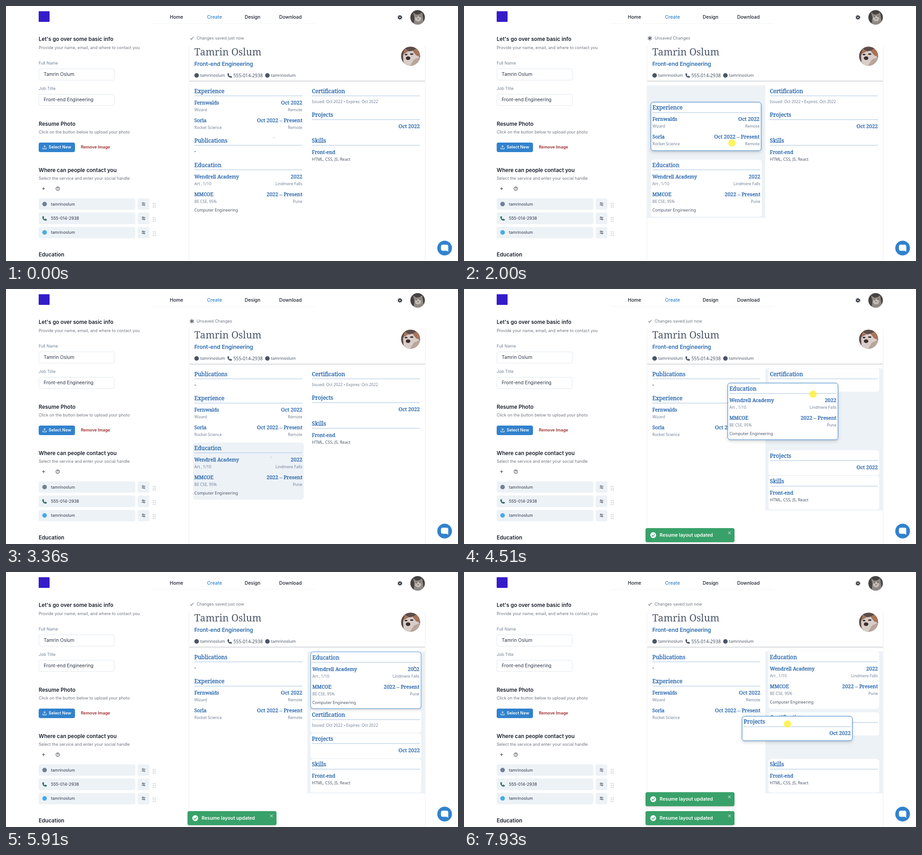
Animation of 996x562 px, one loop 8 s. Source, as an HTML page:

```html
<!DOCTYPE html>
<html lang="en">
<head>
<meta charset="utf-8">
<title>Resume builder</title>
<style>
html, body { margin: 0; width: 100%; height: 100%; overflow: hidden; background: #fff; }
#stage { position: relative; width: 996px; height: 562px; overflow: hidden; background: #fff; }
#stage div, #stage svg { position: absolute; box-sizing: border-box; }
#stage svg { left: 0; top: 0; }
#stage .over { z-index: 9; }
.t { white-space: pre; font: 400 9.08px/20px Inter, sans-serif; color: #717680; }
.head { font-size: 11.67px; font-weight: 600; color: #1a202c; }
.label { color: #718096; }
.nav { font-size: 10.375px; font-weight: 500; color: #1a202c; }
.active { color: #3182ce; }
.value { font-size: 10.375px; color: #2d3748; }
.row { color: #2d3748; }
.strong { font-weight: 600; color: #fff; }
.red { font-weight: 600; color: #9b2c2c; }
.name { font: 400 21.5px/20px "Noto Serif", serif; color: #4a5568; }
.job { font-size: 12.1px; font-weight: 500; color: #2b6cb0; -webkit-text-stroke: .2px #2b6cb0; }
.sec, .item, .date { font: 500 12.4px/20px "Noto Serif", serif; color: #2867ad; margin-top: -.6px; -webkit-text-stroke: .4px #2867ad; }
.item { font-size: 10.9px; }
.date { font-size: 11.5px; }
.sub, .body, .num { font: 400 8.7px/20px "Noto Sans", sans-serif; color: #718096; }
.body { font-size: 9px; color: #4a5568; }
.num { font-size: 10.2px; color: #4a5568; }
.msg { font-size: 10.375px; font-weight: 600; color: #fff; }
.input { left: 72px; width: 166.5px; height: 26.5px; border: 1px solid #e2e8f0; border-radius: 4px; }
.fill { height: 25.6px; background: #edf2f7; border-radius: 4px; }
.col { top: 175px; background: #edf2f7; }
.card { left: 0; top: 0; width: 244px; border: 0 solid; border-radius: 6px; }
.rule { left: 3px; right: 3px; top: 22.4px; height: 1px; background: #a3c1de; }
.toast { left: 400px; top: 0; width: 196px; height: 31px; border-radius: 4px; background: #38a169; box-shadow: 0 3px 6px rgba(0,0,0,.12); }
</style>
</head>
<body>
<div id="stage">
  <div style="left:404px;top:82px;width:519px;height:600px;box-shadow:0 1px 3px rgba(0,0,0,.13)"></div>
  <div style="left:400px;top:74px;width:528px;height:14px;background:#fff"></div>
  <div style="left:404px;top:164.6px;width:519px;height:1px;background:#b0b5be"></div>
  <div style="left:323px;top:38px;width:359px;height:1px;background:#f1f3f5"></div>
  <div class="input" style="top:137.5px"></div>
  <div class="input" style="top:193.5px"></div>
  <div style="left:72px;top:301px;width:80px;height:20.8px;border-radius:4px;background:#3182ce"></div>
  <div id="rows"></div>
  <svg width="996" height="562" fill="none">
    <defs>
      <path id="phone" d="M-4.4-4.3-2.3-5-.9-2-2.2-.8Q-1.2 1.3.8 2.2L2-1+2 .9 5 2.3 4.3 4.4Q4 5 3.2 5-5 4.6-5-3.3-5-4-4.4-4.3Z"/>
      <g id="sliders" stroke="#2d3748" stroke-width="1"><path d="M0-2h4M-4 2h4"/><circle cx="-1.5" cy="-2" r="1.5"/><circle cx="1.5" cy="2" r="1.5"/></g>
      <g id="dots" fill="#a0a5ad"><circle cx="-2" cy="-4" r=".9"/><circle cx="2" cy="-4" r=".9"/><circle cx="-2" r=".9"/><circle cx="2" r=".9"/><circle cx="-2" cy="4" r=".9"/><circle cx="2" cy="4" r=".9"/></g>
      <clipPath id="round1"><circle cx="907" cy="25" r="16"/></clipPath>
      <clipPath id="round2"><circle cx="891.5" cy="110.5" r="21"/></clipPath>
    </defs>
    <rect x="72" y="11.5" width="24" height="23.5" rx="1" fill="#351cc9"/>
    <g stroke="#1a202c"><circle cx="868" cy="25" r="2.6" stroke-width="2"/><circle cx="868" cy="25" r="4.4" stroke-width="1.5" stroke-dasharray="1.75 1.705"/></g>
    <g clip-path="url(#round1)">
      <path d="M890 8h34v34h-34z" fill="#454241"/>
      <path d="M898 42 900 26 897 14 904 19 911 18 917 14 919 27 921 42z" fill="#8f8883"/>
      <ellipse cx="908" cy="28" rx="7" ry="6" fill="#c2bbb5"/>
      <path d="M904 24h2M911 23h2M907 28h2" stroke="#3a3635" stroke-width="1.6"/>
    </g>
    <g clip-path="url(#round2)">
      <path d="M870 89h43v43h-43z" fill="#5d4d4a"/>
      <path d="M876 124 875 110 879 95 888 100 899 98 908 93 913 132H884z" fill="#d8cdc8"/>
      <path d="M876 106 879 94 887 100zM896 99 908 91 913 112 904 109z" fill="#a8745a"/>
      <path d="M899 118 913 112V132H890z" fill="#b9a59b"/>
      <ellipse cx="886" cy="115" rx="5" ry="4" fill="#3c2e2c"/>
      <path d="M880 107h3M892 106h4" stroke="#30282a" stroke-width="3" stroke-linecap="round"/>
    </g>
    <path id="saved" d="M406 71l2.4 2.6 5-5.6" stroke="#5a6270" stroke-width="1.1"/>
    <path id="unsaved" d="M409.5 66v10M405.2 68.5l8.6 5M405.2 73.5l8.6-5" stroke="#5a6270" stroke-width="1.6"/>
    <path d="M85 313v-5M82.8 309.8 85 307.5l2.2 2.3M81.2 312v3h7.6v-3" stroke="#fff"/>
    <path d="M79.5 402.5h6.5M82.75 399.25v6.5" stroke="#2d3748"/>
    <circle cx="114" cy="402.5" r="4" stroke="#2d3748"/>
    <path d="M112.7 401.5q0-1.3 1.3-1.3t1.3 1.2q0 .6-1.3 1.4v.5M114 404v.9" stroke="#2d3748" stroke-width=".9"/>
    <circle cx="85" cy="436.5" r="5" fill="#718096"/>
    <use href="#phone" x="85" y="468" fill="#2c6e69"/>
    <circle cx="85" cy="499" r="5" fill="#45aaea"/>
    <circle cx="420" cy="153" r="5" fill="#4a5568"/>
    <use href="#phone" x="493" y="153" fill="#4a5568"/>
    <circle cx="576" cy="153" r="5" fill="#4a5568"/>
    <use href="#sliders" x="303" y="436.5"/><use href="#sliders" x="303" y="468"/><use href="#sliders" x="303" y="499"/>
    <use href="#dots" x="326.5" y="439"/><use href="#dots" x="326.5" y="470.5"/><use href="#dots" x="326.5" y="502"/>
    <circle cx="966.5" cy="533.5" r="16.2" fill="#3182ce"/>
    <path d="M962.5 526h8q4 0 4 4v11.5l-3.5-2h-8.500q-4 0-4-4V530q0-4 4-4z" fill="#fff"/>
  </svg>
  <div id="texts"></div>
  <div id="cols"></div>
  <div id="toasts" class="over"></div>
  <svg class="over" width="996" height="562">
    <circle id="press" r="8" fill="#fff02e" fill-opacity=".78"/>
    <rect id="dot" width="1.2" height="1.2" fill="#777"/>
    <path id="hand" d="M-2 0V-3.5q.8-1 1.5 0V-.8L2.5 0Q3.8.5 3.4 2L2.6 5H-1.6L-4 1.5Q-3.6.4-2 1.5z" fill="#fff" stroke="#555" stroke-width=".8"/>
  </svg>
</div>
<script>
const $ = id => document.getElementById(id);
const div = (parent, cls, css = '') => {
  const el = document.createElement('div');
  el.className = cls;
  el.style.cssText = css;
  parent.append(el);
  return el;
};
// y is the middle of the capitals; a negative x is measured from the right edge
const text = (parent, x, y, str, cls = '') => {
  const el = div(parent, 't ' + cls, `${x < 0 ? 'right' : 'left'}:${Math.abs(x)}px;top:${y - 10}px`);
  el.textContent = str;
  return el;
};

const person = 'Tamrin Oslum', handle = 'tamrinoslum', phone = '555-014-2938', job = 'Front-end Engineering';
const page = $('texts');
[
  [361, 25, 'Home', 'nav'], [443, 25, 'Create', 'nav active'], [526, 25, 'Design', 'nav'], [602, 25, 'Download', 'nav'],
  [72, 73, "Let's go over some basic info", 'head'],
  [72, 91.5, 'Provide your name, email, and where to contact you'],
  [72, 126, 'Full Name', 'label'], [83, 151, person, 'value'],
  [72, 181.5, 'Job Title', 'label'], [83, 207, job, 'value'],
  [72, 260, 'Resume Photo', 'head'], [72, 278, 'Click on the button below to upload your photo'],
  [94, 311, 'Select New', 'strong'], [165, 311, 'Remove Image', 'red'],
  [72, 362, 'Where can people contact you', 'head'], [72, 380, 'Select the service and enter your social handle'],
  [99, 436.5, handle, 'row'], [99, 468, phone, 'row'], [99, 499, handle, 'row'],
  [72, 547.5, 'Education', 'head'], [72, 565.5, 'Where did you study, and what is it in?'],
  [415, 101, person, 'name'], [415, 128, job, 'job'],
  [428, 153, handle, 'body'], [501, 153, phone, 'num'], [584, 153, handle, 'body']
].forEach(a => text(page, ...a));
const status = text(page, 420, 71, '');

for (const y of [423.8, 455.2, 486.5]) {
  div($('rows'), 'fill', `left:72px;width:213px;top:${y}px`);
  div($('rows'), 'fill', `left:290px;width:26px;top:${y}px`);
}

const colL = div($('cols'), 'col', 'left:404px;width:260px;height:292px');
const colR = div($('cols'), 'col', 'left:664px;width:259px');

const entry = (y, title, date, sub, place) => [
  [3, y, title, 'item'], [-3, y, date, 'date'], [3, y + 15, sub, 'sub'], [-3, y + 15, place, 'sub']
];
const makeCard = (title, height, lines) => {
  const el = div($('cols'), 'card', `height:${height}px`);
  text(el, 3, 12.5, title, 'sec');
  div(el, 'rule');
  lines.forEach(l => text(el, ...l));
  return el;
};
const cards = {
  exp: makeCard('Experience', 108, [
    ...entry(37.5, 'Fernwalds', 'Oct 2022', 'Wizard', 'Remote'),
    ...entry(77, 'Sorla', 'Oct 2022 – Present', 'Rocket Science', 'Remote')]),
  pub: makeCard('Publications', 52, [[3, 35.5, '•', 'body']]),
  edu: makeCard('Education', 126, [
    ...entry(37.5, 'Wendrell Academy', '2022', 'Art , 1/10', 'Lindmere Falls'),
    ...entry(77, 'MMCOE', '2022 – Present', 'BE CSE, 95%', 'Pune'),
    [3, 110.5, 'Computer Engineering', 'body']]),
  cert: makeCard('Certification', 51, [[3, 35, 'Issued: Oct 2022 • Expires: Oct 2022', 'sub']]),
  proj: makeCard('Projects', 55, [[-3, 37.5, 'Oct 2022', 'date']]),
  skill: makeCard('Skills', 74, [[3, 37.5, 'Front-end', 'item'], [3, 53, 'HTML, CSS, JS, React', 'body']])
};

const toasts = [0, 1].map(() => {
  const el = div($('toasts'), 'toast');
  el.innerHTML = '<svg width="196" height="31" fill="none"><circle cx="17" cy="15.5" r="6.5" fill="#fff"/>' +
    '<path d="M14 15.7l2.2 2.2 4-4.5" stroke="#38a169" stroke-width="1.5"/>' +
    '<path d="M182 7.5l6 6M188 7.5l-6 6" stroke="#fff"/></svg>';
  text(el, 31, 15.5, 'Resume layout updated', 'msg');
  return el;
});

const ramp = (t, a, b) => {
  const p = Math.min(1, Math.max(0, (t - a) / (b - a)));
  return p * p * (3 - 2 * p);
};
const pulse = (t, a, b, c, d) => ramp(t, a, b) - ramp(t, c, d);
const mix = (a, b, p) => a + (b - a) * p;
const between = (t, a, b) => t >= a && t < b;
const follow = (t, pts) => {
  let i = 0;
  while (i < pts.length - 2 && t > pts[i + 1][0]) i++;
  const [a, b] = [pts[i], pts[i + 1]];
  const p = Math.min(1, Math.max(0, (t - a[0]) / (b[0] - a[0])));
  return [mix(a[1], b[1], p), mix(a[2], b[2], p)];
};

const LEFT = 412, RIGHT = 671, TOP = 175.5;
const paths = {
  exp: [[1790, LEFT, TOP], [1860, LEFT, 181], [1930, 411.5, 194], [2000, 411.3, 211.3], [2120, 411, 225], [2350, 412, 231], [2550, LEFT, 229]],
  edu: [[3880, LEFT, 338.5], [3950, 422, 331], [4090, 485, 285], [4250, 546, 234], [4510, 580.5, 206.8],
    [4650, 600, 199], [5000, 662, 190], [5300, 694, 187], [5560, 713, 187], [5640, 694, 182], [5740, 678, 177], [5860, RIGHT, TOP]],
  proj: [[7790, RIGHT, 355.5], [7860, 652, 344], [7930, 612.7, 317.7], [8000, 580, 297]]
};

function place(key, [x, y], hover, lift = 0) {
  const el = cards[key], tone = d => Math.round(255 - d * hover);
  el.style.transform = `translate(${x}px,${y}px)`;
  el.style.background = `rgb(${tone(18)},${tone(13)},${tone(8)})`;
  el.style.zIndex = lift > 0 ? 5 : 1;
  el.style.borderWidth = lift > 0 ? '1.3px' : 0;
  el.style.borderColor = `rgba(43,125,199,${lift})`;
  el.style.boxShadow = lift > 0 ? `0 3px 7px rgba(0,0,0,${.17 * lift})` : 'none';
}
function put(id, show, x, y) {
  const el = $(id);
  el.style.display = show ? '' : 'none';
  el.setAttribute('transform', `translate(${x} ${y})`);
}
function toast(el, start, t, y) {
  const p = ramp(t, start, start + 300);
  el.style.opacity = p;
  el.style.transform = `translateY(${y + 24 * (1 - p)}px)`;
}

function draw(t) {
  const expPos = follow(t, paths.exp), eduPos = follow(t, paths.edu), projPos = follow(t, paths.proj);
  const dragging = { exp: between(t, 1790, 2600), edu: between(t, 3880, 5560), proj: t >= 7790 };
  const opened = ramp(t, 4200, 4420) * 127.5;

  place('exp', expPos, pulse(t, 950, 1130, 1790, 1830) + pulse(t, 2660, 2750, 3150, 3360),
    t < 1790 ? 0 : 1 - ramp(t, 2600, 2750));
  place('pub', [LEFT, mix(284.5, TOP, ramp(t, 1930, 2130))], .6 * pulse(t, 900, 990, 990, 1130));
  place('edu', eduPos, pulse(t, 3150, 3360, 3880, 3920) + pulse(t, 6000, 6110, 6400, 6600),
    t < 3880 ? 0 : 1 - ramp(t, 5850, 6050));
  place('cert', [RIGHT, TOP + 127.5 * ramp(t, 4850, 5060) + 56.5 * ramp(t, 7890, 8090)], pulse(t, 6450, 6600, 6680, 6850));
  place('proj', t < 7790 ? [RIGHT, 228 + opened] : projPos, pulse(t, 6800, 7060, 7790, 7830), t < 7790 ? 0 : 1);
  place('skill', [RIGHT, 284.5 + opened], 0);

  colL.style.opacity = pulse(t, 1770, 1880, 2850, 2970) + pulse(t, 3860, 3960, 4200, 4330);
  colR.style.opacity = pulse(t, 4200, 4330, 6000, 6115) + ramp(t, 7770, 7880);
  colR.style.height = 185 + opened + 'px';

  const unsaved = between(t, 1790, 3920);
  status.textContent = unsaved ? 'Unsaved Changes' : 'Changes saved just now';
  $('saved').style.display = unsaved ? 'none' : '';
  $('unsaved').style.display = unsaved ? '' : 'none';

  toast(toasts[0], 3920, t, mix(527, 485.2, ramp(t, 6700, 7000)));
  toast(toasts[1], 6720, t, 527);

  // pointer grips each card at a fixed offset
  const grip = dragging.exp ? [expPos, 179, 90.5] : dragging.edu ? [eduPos, 188.5, 25] : [projPos, 100.5, 17.5];
  put('press', dragging.exp || dragging.edu || dragging.proj, grip[0][0] + grip[1], grip[0][1] + grip[2]);
  const rest = t < 920 ? [590.5, 289.5] : between(t, 3300, 3880) ? [583, 370] : [792, 380.5];
  put('dot', t < 920 || between(t, 3300, 3880) || between(t, 7060, 7790), ...rest);
  put('hand', between(t, 5600, 6300), 901, 212);
}

const begin = performance.now();
function tick() {
  draw((performance.now() - begin) % 8000);
  requestAnimationFrame(tick);
}
tick();
</script>
</body>
</html>
```
